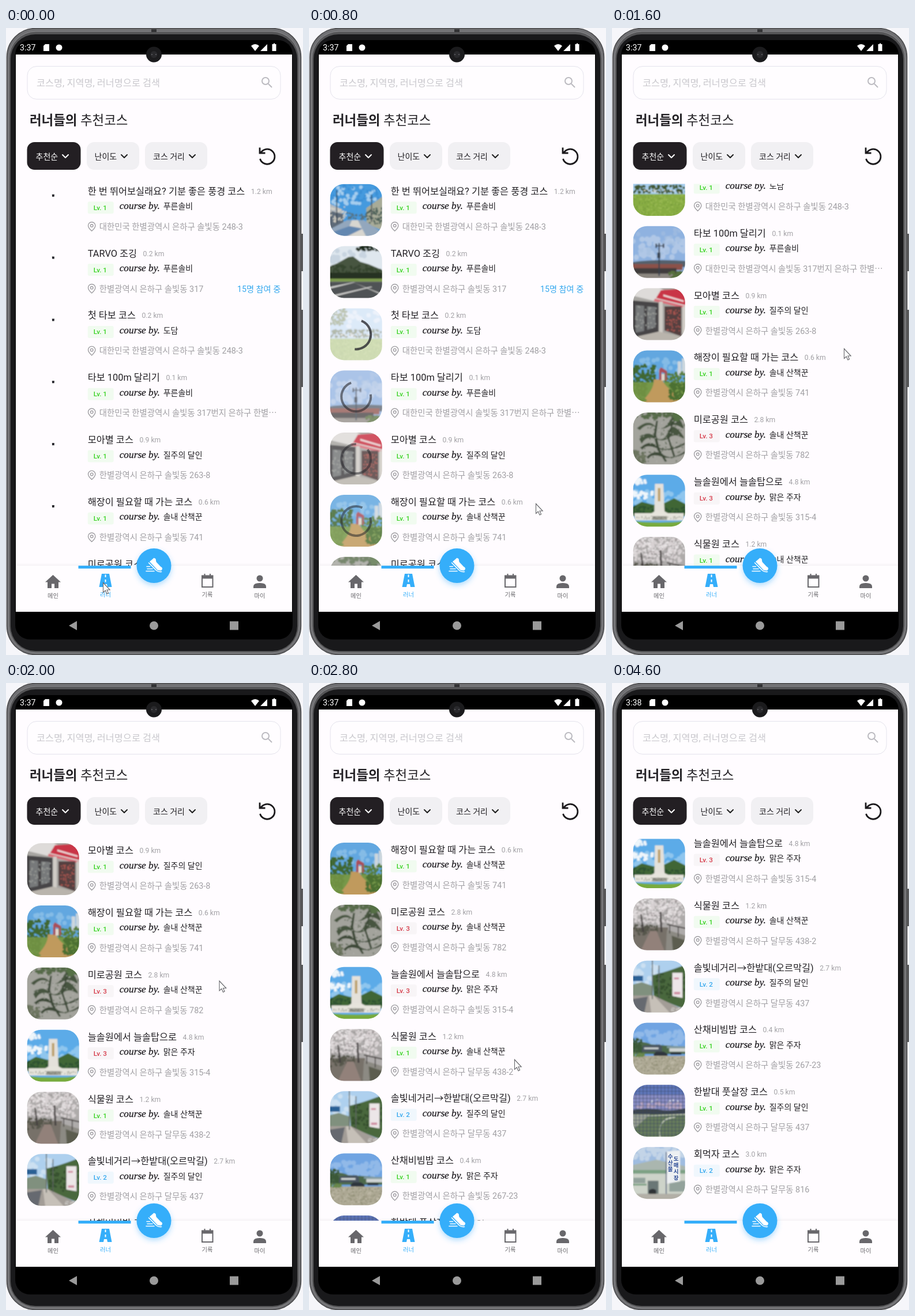
Recreate the animation shown at these times as an HTML page. Size 515 by 1088 pixels, loop 4700 ms.

```html
<!DOCTYPE html>
<html lang="ko">
<head>
<meta charset="utf-8">
<title>추천코스</title>
<style>
html, body { margin: 0; width: 100%; height: 100%; overflow: hidden; background: #f6f6fa; }
svg { display: block; width: 515px; height: 1088px; }
text { font-family: Roboto, 'Noto Sans CJK KR', 'Noto Sans CJK', sans-serif; font-size: 14px; fill: #222024; }
.title { font-size: 16.35px; }
.km { font-size: 12.2px; fill: #a2a1a5; }
.script { font: italic 17.3px 'Liberation Serif', serif; stroke: #222024; stroke-width: .3px; }
.place { font-size: 14.4px; fill: #a09fa3; }
.joined { font-size: 14.2px; fill: #35a8ee; text-anchor: end; }
.level { font-size: 11.7px; font-weight: 500; }
.tab { font-size: 10.3px; fill: #68676b; text-anchor: middle; }
.line { fill: none; stroke-linecap: round; stroke-linejoin: round; }
</style>
</head>
<body>
<svg viewBox="0 0 515 1088">
  <defs>
    <clipPath id="listClip"><rect x="17" y="270.5" width="480" height="663"/></clipPath>
    <clipPath id="thumbClip"><rect width="90" height="90" rx="24"/></clipPath>
    <filter id="soften"><feGaussianBlur stdDeviation=".8"/></filter>
    <filter id="glow" x="-50%" y="-50%" width="200%" height="200%">
      <feDropShadow dx="0" dy="4" stdDeviation="5" flood-color="#35aefa" flood-opacity=".4"/>
    </filter>
    <filter id="navShade" x="-5%" y="-30%" width="110%" height="160%">
      <feDropShadow dx="0" dy="-1" stdDeviation="2" flood-color="#000" flood-opacity=".06"/>
    </filter>
  </defs>

  <!-- phone body -->
  <path d="M510 357h5v65h-5zM510 489h5v134h-5z" fill="#5c5c5e"/>
  <rect x="1.500" y=".5" width="510" height="1087" rx="50" fill="#707073" stroke="#48484a" stroke-width="1.500"/>
  <rect x="5" y="6" width="503" height="1078" rx="47" fill="#555557" stroke="#8a8a8d"/>
  <rect x="8" y="11" width="497" height="1070" rx="43" fill="#19191b"/>
  <path d="M252 2h9v5h-9z" fill="#333335"/>
  <rect x="16" y="21" width="481" height="1040" rx="25" fill="#000"/>
  <rect x="17" y="46" width="479" height="967" fill="#fffcff"/>

  <!-- status bar -->
  <text id="clock" x="24" y="39.300" style="fill:#fff;font-size:14.2px">3:37</text>
  <path d="M68 28h7v12H65V31z" fill="#fff"/>
  <circle cx="92" cy="34" r="5.500" fill="#fff"/>
  <path d="M425 31Q432 25 439 31L432 40zM453 28V40H441zM462 28h2v-1.500h2V28h2.500V40H461.500V28z" fill="#fff"/>
  <circle cx="256.500" cy="46" r="13.500" fill="#1b1b1d"/>
  <circle cx="256.500" cy="46" r="6" fill="#29292c"/>
  <path d="M252 46h2M259 46h2" stroke="#626266" stroke-width="1.500"/>

  <!-- search -->
  <rect x="37" y="66.500" width="439" height="57" rx="16" fill="#fffdff" stroke="#e4e3ec"/>
  <text class="title" x="53" y="100.500" style="fill:#c9c8cd">코스명, 지역명, 러너명으로 검색</text>
  <path class="line" d="M455.500 97.500L460.500 102.500M456 92a6 6 0 1 1-12 0a6 6 0 1 1 12 0z" stroke="#bbbac0" stroke-width="2"/>

  <text x="41" y="168" style="font-size:22.4px"><tspan font-weight="700">러너들의</tspan> 추천코스</text>

  <!-- filters -->
  <rect x="36.500" y="198" width="93" height="48" rx="13" fill="#231f23"/>
  <rect x="140" y="198" width="91" height="48" rx="13" fill="#f1f0f3"/>
  <rect x="241" y="198" width="108" height="48" rx="13" fill="#f1f0f3"/>
  <text x="51.500" y="227.500" style="fill:#fff">추천순</text>
  <text x="153.500" y="227.500">난이도</text>
  <text x="255" y="227.500">코스 거리</text>
  <path class="line" d="M98 220l5 5 5-5" stroke="#fff" stroke-width="2"/>
  <path class="line" d="M200 220l5 5 5-5M318 220l5 5 5-5" stroke="#222" stroke-width="2"/>
  <path d="M440 207.500v9.500h9.500M441.500 217A13 13 0 1 1 440.500 227" fill="none" stroke="#1c1a1d" stroke-width="2.800"/>

  <g clip-path="url(#listClip)"><g id="list"></g></g>

  <!-- bottom tabs -->
  <rect x="17" y="933" width="479" height="80" fill="#fffdff" filter="url(#navShade)"/>
  <rect x="125.500" y="933" width="91" height="5" fill="#35aefa"/>
  <path d="M81.500 949L68 961.500h4V972h7v-7.500h5V972h7v-10.500h4z" fill="#68676b"/>
  <path d="M166 947h13l4.500 23H176l-1-5h-5l-1 5h-7.500z" fill="#35aefa"/>
  <path d="M172.500 948.500v4.500M172.500 957v4.500" stroke="#fff" stroke-width="2"/>
  <path d="M340 950.500h18.500V970H340zM344.500 947v4M354 947v4" fill="none" stroke="#68676b" stroke-width="2"/>
  <path d="M340 951h18.500v4.500H340z" fill="#68676b"/>
  <circle cx="440" cy="955" r="5.500" fill="#68676b"/>
  <path d="M429 972v-3q0-6 11-6t11 6v3z" fill="#68676b"/>
  <text class="tab" x="81.500" y="988.500">메인</text>
  <text class="tab" x="172.500" y="986.500" style="fill:#35aefa">러너</text>
  <text class="tab" x="349" y="986.500">기록</text>
  <text class="tab" x="440" y="988.500">마이</text>
  <circle cx="256.500" cy="933" r="30" fill="#35aefa" filter="url(#glow)"/>
  <path d="M249 926l7.500-6.500 3 1.500 1 5.500 7.500 8q3.500 1.500 3 4.500l-2 2.500-6-.5z" fill="#fff"/>
  <path class="line" d="M247.500 928l13.500 13.500q3 2.500 8.500 2M244 934.500h5.500M245 938.500h9M243 942.500h14" stroke="#fff" stroke-width="1.600"/>

  <path d="M123 1029v16l-14-8z" fill="#9a9a9a"/>
  <circle cx="256.500" cy="1037" r="7.500" fill="#9a9a9a"/>
  <rect x="388" y="1029.500" width="15" height="15" fill="#9a9a9a"/>

  <path id="cursor" d="M.5 .5V17.500L4.300 14 7 20l2.600-1.200L7 13h5.200z" fill="#fff" stroke="#66666b" stroke-width="1.100"/>
</svg>
<script>
const LOOP = 4700, STEP = 100, PITCH = 107.85;
const LEVELS = { 1: ['#38d222', '#f1fbf0'], 2: ['#35a8ee', '#f0f7fd'], 3: ['#d63b4a', '#f8f5f7'] };
const CITY = '한별광역시', SOL = CITY + ' 은하구 솔빛동 ', DAL = CITY + ' 은하구 달무동 ';
const BY = ['푸른솔비', '도담', '질주의 달인', '솔내 산책꾼', '맑은 주자'];
const BASE = 'M0 0h90v90H0z';

// title, km, level, author, place, fade-in start, [spinner start, sweep], scene, participants
// scene layers: [color, path] or [color, count, x, y, w, h, dot size]
const ROWS = [
  ['한 번 뛰어보실래요? 기분 좋은 풍경 코스', 1.2, 1, 0, '대한민국 ' + SOL + '248-3', 350, [60, 250], [
    ['#459ade', BASE], ['#e6f2fa', 34, 6, 6, 72, 32, 6], ['#3a8ed4', 40, 0, 0, 86, 30, 4],
    ['#b3bac0', 'M0 34l22 10v30L0 78z'], ['#5d6b78', 'M0 46l24 6v20L0 80z'], ['#a8ab98', 'M90 22L62 42v26l28 12z'],
    ['#4c6058', 60, 60, 42, 28, 26, 3], ['#d6d2c6', 44, 2, 40, 26, 26, 2.5], ['#56707c', 30, 30, 50, 30, 12, 3], ['#93a7bd', 'M30 62h28L90 84v6H0V78z'],
    ['#d8d6d0', 'M38 62h10l14 28H26z'], ['#6487b0', 'M0 84l34-12 22 4-28 14H0z'], ['#34404c', 'M12 12h1.500v55h-1.500zM70 20h1.500v45h-1.500z']]],
  ['TARVO 조깅', 0.2, 1, 0, SOL + '317', 400, [60, 250], [
    ['#dfe7ee', BASE], ['#b9c9d8', 18, 0, 8, 60, 22, 8], ['#46543f', 'M0 36L14 30 32 20 40 19 52 28 66 32 90 42v14H0z'],
    ['#35442f', 60, 4, 34, 82, 14, 4], ['#1e2b1c', 60, 46, 0, 44, 9, 4], ['#253221', 'M0 46h90v11H0z'], ['#7b9a4e', 'M0 56h90v5H0z'], ['#505254', 'M0 61h90v29H0z'],
    ['#d5d6d3', 'M0 70l40-8h4L0 73zM40 62l50 20v2zM0 85l70-16 2 1L0 88z']], '15명 참여 중'],
  ['첫 타보 코스', 0.2, 1, 1, '대한민국 ' + SOL + '248-3', 640, [25, 155], [
    ['#a9cfee', BASE], ['#edf3f8', 26, 4, 8, 80, 26, 7], ['#5b7540', 80, 0, 0, 30, 30, 4],
    ['#40572f', 90, 0, 38, 90, 12, 4], ['#e2dfd6', 20, 20, 44, 60, 6, 2], ['#87ac43', 'M0 52h90v38H0z'], ['#a0bf58', 140, 0, 54, 90, 36, 2], ['#74993a', 90, 0, 54, 90, 36, 2]]],
  ['타보 100m 달리기', 0.1, 1, 0, `대한민국 ${CITY} 솔빛동 317번지 은하구 한별⋯`, 500, [85, 250], [
    ['#8fb2e0', BASE], ['#c6d6eb', 60, 0, 20, 90, 34, 9], ['#a5bfe0', 24, 5, 6, 75, 46, 7],
    ['#54606c', 'M0 62q40-6 90-2v10H0z'], ['#8b5148', 'M0 65h84v10H0z'], ['#3f3c3d', 'M0 72h74v10H0z'], ['#8c8780', 'M0 81h90v9H0z'],
    ['#56703c', 60, 62, 78, 28, 12, 4], ['#394250', 'M44 30h2v55h-2zM39 34h14v1.500H39zM39 31h2.500v7H39zM51 31h2.500v7H51zM42 46h5v9h-5z']]],
  ['모아별 코스', 0.9, 1, 2, SOL + '263-8', 460, [55, 300], [
    ['#a8a6a2', BASE], ['#dedbd9', 'M0 0h44L90 24v12L0 14z'], ['#c93446', 'M48 5l42-3v28L40 18z'], ['#ecd5d6', 'M52 12l34 10v3L52 15z'], ['#d8707a', 'M38 19l52 13v4L36 23z'],
    ['#464446', 'M0 22l44 4v50L0 86z'], ['#77797a', 'M6 30l14 1v42L6 76zM25 32l14 1v34l-14 4z'], ['#55413f', 'M54 32h28v50L54 72z'],
    ['#a8544f', 50, 58, 38, 22, 36, 2.5], ['#9a9c98', 40, 4, 32, 36, 36, 2.5], ['#d0ccc6', 'M45 24h6v52h-6zM84 32h6v46h-6z'], ['#b9b4ac', 'M0 84l44-10 46 10v6H0z']]],
  ['해장이 필요할 때 가는 코스', 0.6, 1, 3, SOL + '741', 460, [80, 300], [
    ['#62a7e0', BASE], ['#9dcaeb', 24, 10, 16, 70, 20, 7], ['#ccd6dd', 'M76 20h6v24h-6zM83 15h7v28h-7z'], ['#3f6730', 110, 0, 26, 38, 30, 4.5],
    ['#567d39', 80, 52, 38, 38, 22, 4], ['#76984a', 'M0 55h90v35H0z'], ['#c09a5d', 'M36 50h14q3 10 20 22 10 9 8 19H12q26-24 24-41z'],
    ['#4c7030', 100, 62, 56, 28, 28, 4], ['#6e8f42', 70, 0, 56, 24, 30, 4], ['#a9505a', 'M45 34l3-4 10 6v16h-3V40l-6-2v13h-4z'], ['#e3d5cd', 'M49 41h5v11h-5z']]],
  ['미로공원 코스', 2.8, 3, 3, SOL + '782', 480, [60, 290], [
    ['#a3a39c', BASE], ['#566a4a', 70, 0, 0, 90, 12, 5], ['#6c745f', 80, 0, 66, 22, 24, 4],
    ['#46543f', 'M8 28q18-16 30-4t24-8 24 10l-1 3q-13-11-24-4t-24 0-24 6zM12 46q12-16 26-4t22-8 26 8v3.500q-14-10-24-2t-24 2-22 8z'],
    ['#3d4a37', 'M14 60q16-14 28-2t46-6l-1 3.500q-25 14-45 6T17 64zM24 76q14-14 28-4t36-6v3.500q-20 12-38 6T27 79zM40 16l3-1-3 24 6 24 12 20-3 1-13-20-6-24zM66 16l3 1-7 28 10 30-3 1-10-31z'],
    ['#bdbdb8', 60, 14, 14, 70, 70, 1.600], ['#4a5942', 60, 14, 14, 74, 70, 2], ['#557044', 50, 70, 0, 20, 14, 5]]],
  ['늘솔원에서 늘솔탑으로', 4.8, 3, 4, SOL + '315-4', 1050, [60, 250], [
    ['#5babe8', BASE], ['#b3d8f2', 50, 0, 30, 90, 22, 8], ['#eff6fb', 24, 0, 30, 34, 12, 5], ['#eff6fb', 14, 2, 8, 20, 10, 5], ['#3f6636', 'M0 56l16-9 20 5 18-3 16-8 20 10v20H0z'],
    ['#2d5230', 60, 0, 55, 90, 11, 4], ['#e4e1da', 'M38 17h14l2 46 6 7H32l5-7z'], ['#bca06a', 'M43 24h4v22h-4z'],
    ['#e6e4dc', 'M4 66h28l6-3h16l6 3h26v12H4z'], ['#85867d', 'M34 71h24v6H34z'], ['#a9a99c', 40, 6, 71, 78, 5, 2], ['#78ab3e', 'M0 79q45 5 90 0v11H0z']]],
  ['식물원 코스', 1.2, 1, 3, DAL + '438-2', 1100, [60, 250], [
    ['#aeabaa', BASE], ['#d8d2d3', 180, 0, 0, 82, 44, 4.5], ['#8c8586', 90, 0, 4, 80, 44, 2], ['#ece8e9', 130, 0, 0, 90, 34, 2.5],
    ['#777169', 'M0 50h60v40H0z'], ['#56564c', 80, 0, 46, 42, 18, 3.5], ['#92817a', 'M30 56h11l13 34H14z'], ['#8c8a83', 'M58 54l32 10v26H56z'],
    ['#45413f', 'M46 24h2.500l2 34h-3zM14 28h2l4 30h-3zM58 44l32 7v2l-32-7zM62 46h1.500v14H62zM76 48h1.500v18H76z'], ['#5b5d50', 'M66 64l24 8v18H68z']]],
  ['솔빛네거리→한밭대(오르막길)', 2.7, 2, 2, DAL + '437', 1600, [60, 250], [
    ['#aed0ee', BASE], ['#e0ebf3', 24, 0, 10, 46, 30, 8], ['#80907e', 'M0 42l16-4 18 6v20H0z'], ['#4a673c', 'M34 26q20-4 56-18v76L36 62z'],
    ['#35502d', 120, 38, 24, 50, 40, 3.5], ['#a39d97', 'M0 60h36l54 26v4H0z'], ['#c6c0b8', 'M28 60h8l28 30H32z'], ['#66696f', 'M0 66l26-4-6 28H0z'],
    ['#5f6563', 'M33 0h1.500v66H33zM44 10h1.500v55H44z'], ['#2c6095', 'M0 27h18v9H0z'], ['#ece6e8', 'M67 22h17v42l-17-3z'], ['#cf8ea2', 'M70 30h8v3h-8zM70 54h10v4H70z'], ['#cfcdca', 24, 62, 80, 24, 6, 2]]],
  ['산채비빔밥 코스', 0.4, 1, 4, SOL + '267-23', 2000, [300, 130], [
    ['#6fa4e2', BASE], ['#a9c8ec', 60, 0, 16, 90, 24, 8], ['#4d694c', 'M0 38q14-8 32 0l58 4v12H0z'], ['#3b5837', 50, 0, 28, 16, 22, 4],
    ['#4a5460', 'M18 40l28-2 4 4v8H16z'], ['#d0d5d5', 'M20 43h24v3H20zM62 44h28v6H62z'], ['#829ba3', 'M58 41h32v3H58z'], ['#2d353e', 'M36 54l4-4h13l6 4v4H36zM64 51h18v4H64z'],
    ['#aca793', 'M0 57h90v33H0z'], ['#8c8b72', 140, 0, 60, 90, 28, 2], ['#c2bdab', 120, 0, 58, 90, 30, 2], ['#68874a', 40, 0, 53, 20, 5, 3]]],
  ['한밭대 풋살장 코스', 0.5, 1, 2, DAL + '437', 2350, [60, 250], [
    ['#6078bd', BASE], ['#8b8fc6', 'M0 18h90v28H0z'], ['#b9a7c4', 30, 6, 32, 78, 8, 5], ['#3c444c', 'M0 44q22-5 44-1t46-3v13H0z'],
    ['#687d5c', 'M0 51h90v39H0z'], ['#9aa092', 'M0 51h30L0 78z'], ['#ccd2c0', 'M0 54l90-4v1.500L0 55.500zM46 90q-4-28 16-34l10-1v1.500q-33 4-24 33.500z'],
    ['#e6eaf2', 8, 18, 26, 60, 6, 2.5], ['#3a4560', Array.from({ length: 16 }, (_, i) => `M${i * 6} 0h.7v90h-.7zM0 ${i * 6}h90v.7H0z`).join('')]]],
  ['회먹자 코스', 3.0, 2, 4, DAL + '816', 2700, [60, 250], [
    ['#9fbce0', BASE], ['#dbe4ed', 50, 0, 0, 90, 22, 8], ['#aab6af', 'M0 32l40-9 50 11v50H0z'], ['#cdd3c9', 'M0 46h90v34H0z'],
    ['#7da184', 'M0 40h90v6H0zM0 63h24v3H0z'], ['#93a29b', 'M2 53h20v9H2zM62 58h28v18H62z'], ['#6b7776', 'M26 58h18v22H26z'], ['#2d3235', 'M28 74q7-5 12 0v8H28z'],
    ['#b2afa6', 'M0 80h90v10H0z'], ['#edf0f2', 'M58 9l22-2v52l-22 4z'], ['#4a5678', 'M56 10h1.500v70H56z']]]
];
const SIGN = ['수산물', '도매시장'].map((word, col) => [...word].map((ch, i) =>
  `<text x="${60 + col * 10}" y="${20 + col * 4 + i * 11}" style="font-size:9.5px;font-weight:700;fill:#2b4a94">${ch}</text>`).join('')).join('');

function seeded(seed) {
  return () => (seed = (seed * 16807) % 2147483647) / 2147483647;
}

function drawScene(layers, seed) {
  const rnd = seeded(seed * 7919 + 17);
  return layers.map(([color, shape, x, y, w, h, size]) => {
    if (typeof shape === 'string') return `<path d="${shape}" fill="${color}"/>`;
    let d = '';
    for (let i = 0; i < shape; i++) d += `M${(x + rnd() * w).toFixed(1)} ${(y + rnd() * h).toFixed(1)}h.1`;
    // large dots are clouds and haze
    const soft = size > 5 ? ' opacity=".6"' : '';
    return `<path d="${d}" stroke="${color}" stroke-width="${size}" stroke-linecap="round"${soft}/>`;
  }).join('');
}

const list = document.getElementById('list');
list.innerHTML = ROWS.map(([title, km, level, by, place, , , scene, joined], i) => {
  const [ink, paper] = LEVELS[level];
  return `<g transform="translate(36.700 ${270.7 + PITCH * i})">
    <g class="photo" clip-path="url(#thumbClip)">
      <g transform="translate(-1.800 -1.800) scale(1.04)" filter="url(#soften)">${drawScene(scene, i + 1)}</g>
      ${i === 12 ? SIGN : ''}
    </g>
    <circle class="spin" cx="45" cy="45.500" r="25.500" pathLength="360" fill="none" stroke="#26262c" stroke-width="4"/>
    <text class="title" x="105" y="18">${title}<tspan class="km" dx="10.500" dy="-1">${km.toFixed(1)} km</tspan></text>
    <rect x="105" y="30.500" width="45" height="21" rx="3" fill="${paper}"/>
    <text class="level" x="115" y="45" style="fill:${ink}">Lv. ${level}</text>
    <text class="script" x="160" y="43.500">course by.</text>
    <text x="236" y="43.500">${BY[by]}</text>
    <path class="line" d="M112 81.500q-6.200-5.500-6.200-9.300a6.200 6.200 0 0 1 12.400 0q0 3.800-6.200 9.300zM114.300 72.300a2.300 2.300 0 1 1-4.600 0a2.300 2.300 0 1 1 4.600 0z" stroke="#a09fa3" stroke-width="1.400"/>
    <text class="place" x="125" y="79">${place}</text>
    ${joined ? `<text class="joined" x="439.500" y="79">${joined}</text>` : ''}
  </g>`;
}).join('');

const photos = list.querySelectorAll('.photo');
const spins = list.querySelectorAll('.spin');
const cursor = document.getElementById('cursor');
const clock = document.getElementById('clock');

const SCROLL = [[1300, 0], [1400, 66], [1500, 166], [1600, 250.5], [1700, 315], [1800, 360], [1900, 395],
  [2000, 424], [2100, 446], [2300, 480], [2500, 507], [2800, 533], [2900, 536], [3000, 548], [3100, 600], [3300, 728], [3400, 759.7]];
const POINTER = [[0, 168, 962], [100, 178, 940], [250, 320, 600], [400, 440, 240], [500, 425, 470], [600, 408, 700],
  [700, 398, 805], [800, 393, 825], [1200, 402, 830], [1300, 402, 812], [1400, 402, 740], [1600, 402, 556],
  [1700, 400, 495], [1800, 390, 470], [1900, 378, 485], [2100, 361, 548], [2300, 357, 574], [2800, 356, 653],
  [2900, 356, 656], [3000, 358, 640], [3200, 364, 535], [3400, 365, 497], [3500, 478, 470]];

const clamp = v => Math.max(0, Math.min(1, v));

function sample(track, t, k = 1) {
  const i = track.findIndex(p => p[0] > t);
  if (i === 0) return track[0][k];
  if (i < 0) return track[track.length - 1][k];
  const a = track[i - 1], b = track[i];
  return a[k] + (b[k] - a[k]) * (t - a[0]) / (b[0] - a[0]);
}

function render(t) {
  list.setAttribute('transform', `translate(0 ${-sample(SCROLL, t)})`);
  ROWS.forEach((row, i) => {
    const start = row[5], [angle, sweep] = row[6];
    const shown = clamp((t - start) / 400);
    const turn = Math.max(0, t - (i < 7 ? 0 : start - 500)) / 800;
    photos[i].setAttribute('opacity', shown);
    spins[i].setAttribute('opacity', shown < 1 ? 1 - shown * .55 : 0);
    spins[i].setAttribute('stroke-dasharray', `${Math.min(330, 9 + sweep * turn)} 360`);
    spins[i].setAttribute('transform', `rotate(${angle * turn - 94} 45 45.500)`);
  });
  cursor.setAttribute('transform', `translate(${sample(POINTER, t)} ${sample(POINTER, t, 2)})`);
  cursor.setAttribute('visibility', t < 3600 ? 'visible' : 'hidden');
  clock.textContent = t < 4400 ? '3:37' : '3:38';
}

const began = performance.now();
function tick() {
  const t = (performance.now() - began) % LOOP;
  render(Math.floor(t / STEP) * STEP);
  requestAnimationFrame(tick);
}
render(0);
requestAnimationFrame(tick);
</script>
</body>
</html>
```
